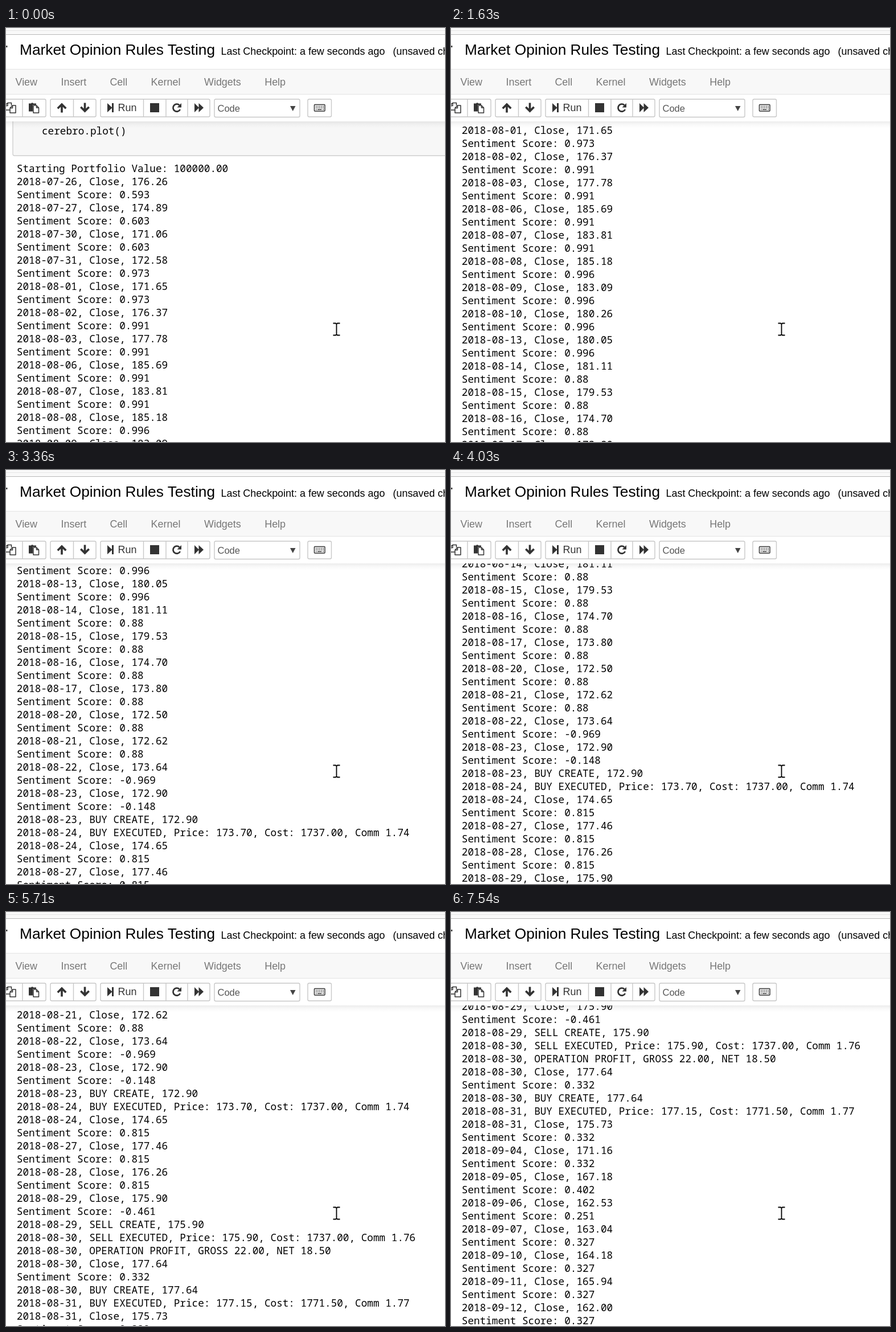
Write an HTML page that moves like this. It is 771x727 px and loops after 8 s.

```html
<!DOCTYPE html>
<html lang="en">
<head>
<meta charset="utf-8">
<title>Notebook output scrolling</title>
<style>
  html, body { margin: 0; width: 100%; height: 100%; overflow: hidden; background: #fff; }
  svg { display: block; }
  text { font: 17.93px "Liberation Sans", Arial, sans-serif; }
  #page text { font: 17.71px "Noto Sans Mono", "DejaVu Sans Mono", monospace; fill: #000; }
  #menu text { fill: #777; }
  .title { font-size: 26.3px; }
  .button { fill: #fff; stroke: #c8c8c8; stroke-width: 1.4; }
  .icon { fill: #333; }
  .line { fill: none; stroke: #333; stroke-width: 1.5; stroke-linejoin: round; }
</style>
</head>
<body>
<svg width="771" height="727" viewBox="0 0 771 727">
  <defs>
    <linearGradient id="shade" x2="0" y2="1">
      <stop offset="0" stop-color="#575757" stop-opacity=".11"/>
      <stop offset=".5" stop-color="#575757" stop-opacity=".035"/>
      <stop offset="1" stop-color="#575757" stop-opacity="0"/>
    </linearGradient>
  </defs>

  <g id="page">
    <rect x="12" y="-100" width="900" height="324.3" rx="3" fill="#f7f7f7" stroke="#cfcfcf" stroke-width="1.4"/>
    <text x="63" y="187">cerebro.plot()</text>
  </g>

  <rect y="164" width="771" height="12" fill="url(#shade)"/>

  <g id="header">
    <rect width="771" height="164" fill="#fff"/>
    <rect width="771" height="11" fill="#f9f9f9"/>
    <rect y="4" width="771" height="1" fill="#e6e6e6"/>
    <rect y="11" width="771" height="1" fill="#b8b8b8"/>
    <rect y="31" width="2.5" height="3" fill="#4e4e4e"/>
    <text class="title" x="24" y="47">Market Opinion Rules Testing</text>
    <text x="377.5" y="47">Last Checkpoint: a few seconds ago</text>
    <text x="679.5" y="47">(unsaved changes)</text>

    <g id="menu">
      <rect x="-5" y="72.5" width="781" height="44" fill="#f8f8f8" stroke="#e7e7e7" stroke-width="1.3"/>
      <text x="16.5" y="101">View</text>
      <text x="96.5" y="101">Insert</text>
      <text x="182.4" y="101">Cell</text>
      <text x="254.6" y="101">Kernel</text>
      <text x="348" y="101">Widgets</text>
      <text x="454.2" y="101">Help</text>
    </g>

    <g class="button">
      <rect x="-12" y="125" width="82" height="31" rx="2.5"/>
      <rect x="78" y="125" width="80" height="31" rx="2.5"/>
      <rect x="166" y="125" width="192" height="31" rx="2.5"/>
      <rect x="366" y="125" width="150" height="31.5" rx="2.5"/>
      <rect x="530" y="125" width="41.5" height="31" rx="2.5"/>
      <path d="M29 125v31M118.5 125v31M241.5 125v31M281 125v31M319 125v31"/>
    </g>

    <!-- copy, paste -->
    <path class="line" d="M7 144H-2V136L3 131.5H9.500V136M3 131.500V136.500H-2M7 140.500L11.500 136H17V149H7ZM11.500 136V140.500H7"/>
    <path class="icon" d="M40 132.500H44Q46 130 48 132.500H53V135H47V146.500H40Z"/>
    <path class="line" d="M48 136H53.500L57.500 140V149H48ZM53.500 136V140H57.500"/>

    <!-- move up, move down -->
    <path id="arrow" class="icon" d="M98 131.500L106.500 140L104 142.500L99.800 138.400V148.500H96.200V138.400L92 142.500L89.500 140Z"/>
    <use href="#arrow" transform="rotate(180 118.250 140)"/>

    <!-- run, stop, restart, run all -->
    <path class="icon" d="M178 132L186 139.500V132H189V148H186V140.500L178 148Z"/>
    <text x="196.500" y="146" fill="#333">Run</text>
    <rect class="icon" x="253" y="132" width="16" height="16"/>
    <path d="M304.500 135.500A6.500 6.500 0 1 0 305.800 143" fill="none" stroke="#333" stroke-width="2.800"/>
    <path class="icon" d="M308 132V139.500H300.500Z"/>
    <path class="icon" d="M331 132L338.500 139.500V132L347 140L338.500 148V140.500L331 148Z"/>

    <text x="371.500" y="147" fill="#555" style="font-size:16.500px">Code</text>
    <path d="M499 137H508.500L503.750 146Z" fill="#444"/>

    <!-- keyboard -->
    <rect class="line" x="541.500" y="134.500" width="18.500" height="11.500" rx="1"/>
    <path d="M544 137.500H558M544 140.300H558" stroke="#333" stroke-width="1.500" stroke-dasharray="1.600 1.500"/>
    <path d="M544 143.200H545.500M547 143.200H554.500M556.500 143.200H558" stroke="#333" stroke-width="1.500"/>
  </g>

  <g fill="none">
    <path id="beam" d="M574.500 518.500H579L580.500 520L582 518.500H586.500M580.500 520V538M574.500 539.500H579L580.500 538L582 539.500H586.500" stroke="#fff" stroke-width="3.500"/>
    <use href="#beam" style="display:none"/>
    <path d="M574.500 518.500H579L580.500 520L582 518.500H586.500M580.500 520V538M574.500 539.500H579L580.500 538L582 539.500H586.500" stroke="#000" stroke-width="1.800"/>
  </g>
</svg>

<script>
const LOOP = 8000, ROW = 23, NOTCH = 92, GLIDE = 250;

// "day close score" makes two rows; "day: message" makes one.
const log = `07-26 176.26 0.593
07-27 174.89 0.603
07-30 171.06 0.603
07-31 172.58 0.973
08-01 171.65 0.973
08-02 176.37 0.991
08-03 177.78 0.991
08-06 185.69 0.991
08-07 183.81 0.991
08-08 185.18 0.996
08-09 183.09 0.996
08-10 180.26 0.996
08-13 180.05 0.996
08-14 181.11 0.88
08-15 179.53 0.88
08-16 174.70 0.88
08-17 173.80 0.88
08-20 172.50 0.88
08-21 172.62 0.88
08-22 173.64 -0.969
08-23 172.90 -0.148
08-23: BUY CREATE, 172.90
08-24: BUY EXECUTED, Price: 173.70, Cost: 1737.00, Comm 1.74
08-24 174.65 0.815
08-27 177.46 0.815
08-28 176.26 0.815
08-29 175.90 -0.461
08-29: SELL CREATE, 175.90
08-30: SELL EXECUTED, Price: 175.90, Cost: 1737.00, Comm 1.76
08-30: OPERATION PROFIT, GROSS 22.00, NET 18.50
08-30 177.64 0.332
08-30: BUY CREATE, 177.64
08-31: BUY EXECUTED, Price: 177.15, Cost: 1771.50, Comm 1.77
08-31 175.73 0.332
09-04 171.16 0.332
09-05 167.18 0.402
09-06 162.53 0.251
09-07 163.04 0.327
09-10 164.18 0.327
09-11 165.94 0.327
09-12 162.00 0.327`;

function expand(entry) {
  if (entry[5] === ":") return ["2018-" + entry.replace(":", ",")];
  const [day, close, score] = entry.split(" ");
  return [`2018-${day}, Close, ${close}`, `Sentiment Score: ${score}`];
}

const page = document.getElementById("page");
const rows = ["Starting Portfolio Value: 100000.00", ...log.split("\n").flatMap(expand)];
rows.forEach((row, i) => {
  const text = document.createElementNS("http://www.w3.org/2000/svg", "text");
  text.setAttribute("x", 18.8);
  text.setAttribute("y", 253 + i * ROW);
  text.textContent = row;
  page.append(text);
});

// Wheel notches by start time; the first is already under way.
const notches = [-103, 605, 1075, 1485, 1755, 2023, 2715, 3303, 4015, 4675, 5590, 6235, 6690, 7285];

// Visible updates: first time, last time, count.
const bursts = [
  [80, 160, 2], [620, 860, 4], [1110, 1320, 4], [1500, 2010, 7], [2100, 2250, 3],
  [2730, 2970, 4], [3360, 3580, 4], [4030, 4270, 4], [4690, 4900, 4],
  [5600, 5860, 4], [6250, 6490, 4], [6780, 6930, 3], [7310, 7540, 4]
];

const ease = p => {
  p = Math.min(1, Math.max(0, p));
  return p * p * (3 - 2 * p);
};

const scrollAt = t =>
  Math.round(notches.reduce((sum, start) => sum + NOTCH * ease((t - start) / GLIDE), -34));

// Each update holds until the next; the last of a burst has settled.
const steps = [{ time: 0, y: 0 }];
for (const [from, to, count] of bursts) {
  for (let i = 0; i < count; i++) {
    const time = from + (to - from) * i / (count - 1);
    steps.push({ time, y: scrollAt(i === count - 1 ? time + 40 : time) });
  }
}

const began = performance.now();
function draw() {
  const t = (performance.now() - began) % LOOP;
  const step = steps.findLast(s => s.time <= t) || steps[0];
  page.setAttribute("transform", `translate(0 ${-step.y})`);
  requestAnimationFrame(draw);
}
draw();
</script>
</body>
</html>
```
